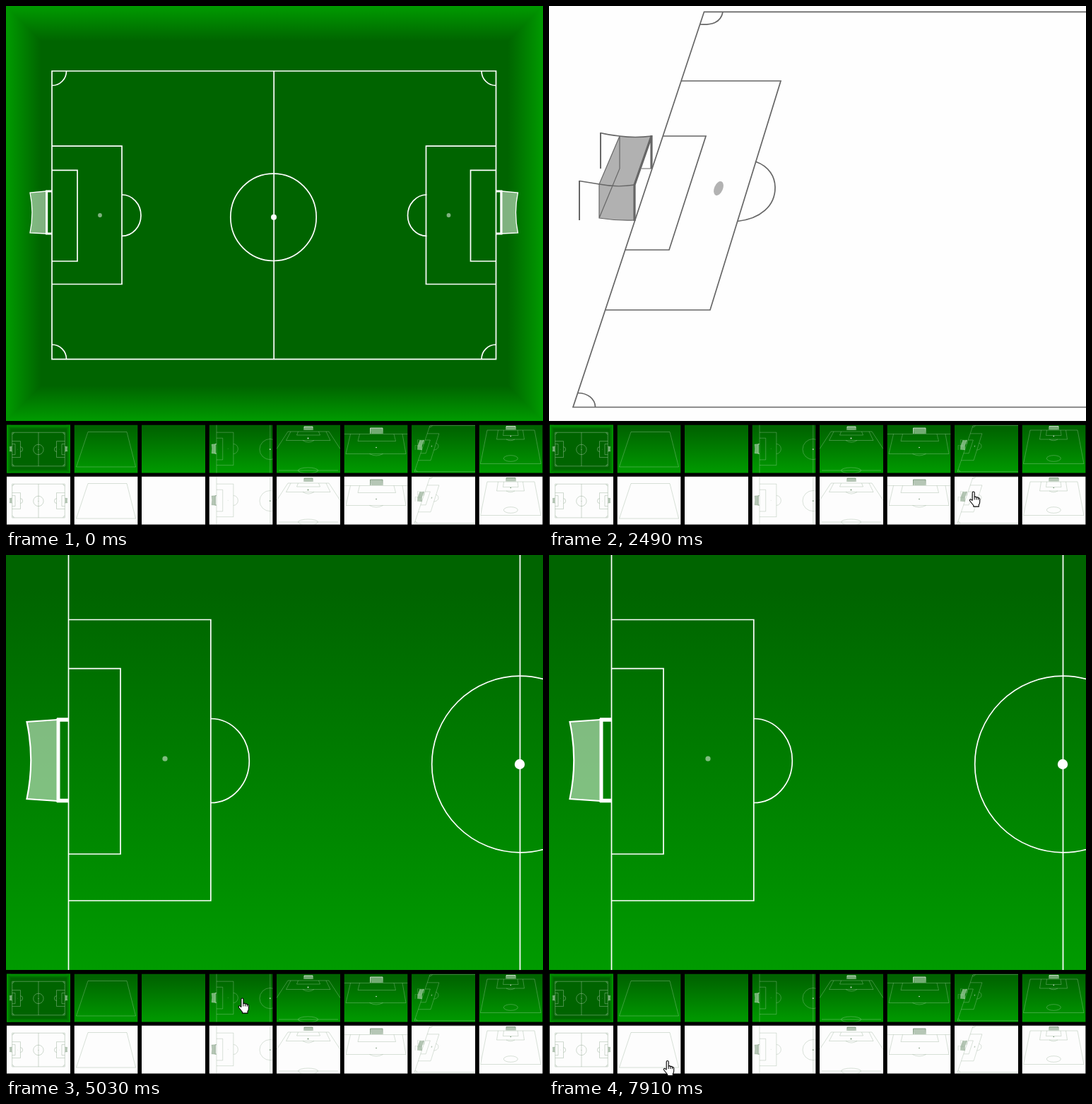
Animation of 760x737 px, one loop 8 s. Source, as an HTML page:

```html
<!DOCTYPE html>
<html lang="en">
<head>
<meta charset="utf-8">
<title>Pitch backgrounds</title>
<style>
  html, body { margin: 0; width: 100%; height: 100%; overflow: hidden; background: #000; }
  svg { display: block; width: 100vw; height: 100vh; }
  .line { fill: none; stroke: currentColor; stroke-width: var(--w); }
  .net { fill: currentColor; fill-opacity: .5; }
  .solid { fill: currentColor; }
  .frame { fill: none; stroke: currentColor; }
</style>
</head>
<body>
<svg id="stage" viewBox="0 0 760 737" preserveAspectRatio="none">
  <defs>
    <linearGradient id="grass" x2="0" y2="1">
      <stop offset=".08" stop-color="#006400"/><stop offset="1" stop-color="#009b00"/>
    </linearGradient>
    <linearGradient id="edgeX">
      <stop stop-color="#009b00"/><stop offset="1" stop-color="#006400"/>
    </linearGradient>
    <linearGradient id="edgeY" x2="0" y2="1">
      <stop stop-color="#009b00"/><stop offset="1" stop-color="#006400"/>
    </linearGradient>
    <clipPath id="mainClip"><path d="M0 0H760V587H0z"/></clipPath>
    <clipPath id="cellClip"><path d="M0 0H90V68H0z"/></clipPath>
  </defs>
</svg>
<script>
const LOOP = 8000, STEP = 70;
const stage = document.getElementById('stage');

const line = d => `<path class="line" d="${d}"/>`;
const net = d => `<path class="net" d="${d}"/>`;
const frame = (d, width) => `<path class="frame" stroke-width="${width}" d="${d}"/>`;
const dot = (x, y, r, cls = 'solid') => `<circle class="${cls}" cx="${x}" cy="${y}" r="${r}"/>`;
const mirror = (markup, width) => `<g transform="matrix(-1 0 0 1 ${width} 0)">${markup}</g>`;

// Backgrounds, 760 x 587
const plain = fill => `<path fill="${fill}" d="M0 0H760V587H0z"/>`;
const bevel = () => {
  const side = '<path fill="url(#edgeX)" d="M0 0H50V587H0z"/>';
  const end = '<path fill="url(#edgeY)" d="M0 0H760L710 50H50z"/>';
  return plain('#006400') + side + mirror(side, 760) +
    end + `<g transform="matrix(1 0 0 -1 0 587)">${end}</g>`;
};

// Pitch markings, 760 x 587
function wholePitch() {
  const area =
    line('M65 198.2H164V393.5H65M65 232.4H101V361H65') +
    line('M85.5 92A20.5 20.5 0 0 1 65 112.5M65 479A20.5 20.5 0 0 1 85.5 499.7') +
    net('M34 264L57 262V322L34 321Q40 292 34 264z') +
    frame('M57 262L34 264Q40 292 34 321L57 322', 1.3) +
    frame('M65 262H57.6V322H65', 3.2);
  const spot = line('M164 267A27 29.2 0 0 1 164 325.4') + dot(133, 296, 2.9, 'net');
  return line('M65 92H693.5V499.7H65zM379.2 92V499.7') +
    '<ellipse class="line" cx="378.5" cy="298.8" rx="60.7" ry="61.7"/>' + dot(379, 298.8, 4) +
    area + spot + mirror(area, 758.5) + mirror(spot, 759.5);
}

function halfPitch() {
  return line('M88.5 0V587M727.5 0V587M88.5 91.5H289.8V489H88.5M88.5 160.7H162V423H88.5') +
    line('M289.8 231.5A54.5 59.5 0 0 1 289.8 350.5') +
    '<circle class="line" cx="727.5" cy="296" r="124.8"/>' +
    dot(727, 296, 7.2) + dot(225, 288.2, 3.6, 'net') +
    net('M29.5 236L73 233V348L29.5 345Q41 290 29.5 236z') +
    frame('M73 233L29.5 236Q41 290 29.5 345L73 348', 2.2) +
    frame('M74 231V350', 5) + frame('M72 233H88M72 347.5H88', 5.5);
}

function slantedPitch() {
  return line('M760 8.3H219.5L34 567.5H760M187 106H328L228 430H80M161 184H222L170 345H108') +
    line('M246 8.5C243 24 230 27 213 26M40 547.5C55 547 65 556 65.5 567') +
    line('M292 220C312 227 320 242 320 257C320 283 299 301 267 304.5') +
    '<ellipse class="net" rx="6" ry="10.5" transform="translate(240 258) rotate(23)"/>' +
    net('M100 184Q122 187 145 184L121 253V303Q96 304 71 300V252z') +
    frame('M73 179.5Q85 182.5 100 184Q122 187 145 184M43 247.5L71 252Q96 257 121 253', 1.3) +
    frame('M100 184L71 252V300Q96 304 121 303M100 184V230L71 300M131 230H145', 1.2) +
    frame('M73 179V230M43 247V303', 2) +
    frame('M145 183V230M145 184L121 253V304', 3.2);
}

// Markings seen only in the picker, 90 x 68
const trapezoid = () => line('M19.5 10H74.5L87 59.5H3z');

const smallGoal = (x, y, w, h) =>
  net(`M${x} ${y}h${w}l-1 ${h}h${2 - w}z`) + frame(`M${x} ${y + h}v${-h}h${w}v${h}`, .8);

const behindGoal = () =>
  line('M0 34L16 9.5H74L90 34M20 9.5L13.5 22H76L70 9.5M30.5 9.5L28.5 14.5H61.5L59.5 9.5') +
  line('M37 22Q45 27 53 22M3 64.5H87') +
  '<ellipse class="line" cx="44.5" cy="64.5" rx="14" ry="4"/>' +
  dot(44.5, 19, .9) + smallGoal(39, 2.5, 12, 5);

const nearGoal = () =>
  line('M0 13H90M9 13L2.5 41H87.5L82.5 13M22 13L19.5 23H73L70.5 13M36 41Q45.5 46 55 41') +
  dot(45.5, 32, .8) + smallGoal(37, 4.5, 17.5, 8);

const highView = () =>
  line('M11.5 7.5H78.5L87.5 55H2zM27 7.5L25 20.5H64L62 7.5M35 7.5L34 15H55.5L54.5 7.5') +
  line('M38.5 20.5Q44.5 24 50.5 20.5') +
  '<ellipse class="line" cx="44.8" cy="47.5" rx="10" ry="4.3"/>' +
  dot(44.8, 16, .8) + smallGoal(38.5, 2, 13, 5);

const shrink = markup => `<g transform="scale(.1186 .1168)">${markup}</g>`;
const shrunkLines = (draw, width) => () => `<g style="--w:${width}">${shrink(draw())}</g>`;

const picker = [
  shrunkLines(wholePitch, 2.8), trapezoid, () => '', shrunkLines(halfPitch, 2.2),
  behindGoal, nearGoal, shrunkLines(slantedPitch, 2.2), highView
];

function cell(draw, i, isGreen) {
  const back = isGreen ? (i ? plain('url(#grass)') : bevel()) : plain('#fdfdfd');
  const look = isGreen ? 'color:#e6f0e6' : 'color:#6f8f6f';
  return `<g transform="translate(${1 + i * 95.5} ${isGreen ? 592.5 : 665.5})" clip-path="url(#cellClip)"
    style="${look};--w:.27">${shrink(back)}${draw()}</g>`;
}

const view = (back, draw, color) =>
  `<g class="view" clip-path="url(#mainClip)" style="color:${color};--w:1.7">${back}${draw()}</g>`;

stage.insertAdjacentHTML('beforeend',
  '<path d="M0 0H760V737H0z"/>' +
  view(bevel(), wholePitch, '#fff') +
  view(plain('#fefefe'), slantedPitch, '#666') +
  view(plain('url(#grass)'), halfPitch, '#fff') +
  picker.map((draw, i) => cell(draw, i, true) + cell(draw, i, false)).join('') +
  `<g id="pointer">
    <circle id="click" cx="4.3" cy=".5" r="13.6" fill="#ff0" fill-opacity=".5"/>
    <path fill="#fff" stroke="#000" stroke-width="1.1" stroke-linejoin="round"
      d="M4.2 12.5V2a1.5 1.5 0 0 1 3 0V8q1.6-1 2.8.6q1.7-.8 2.6.8q1.8-.4 2.1 1.6V15q0 2.5-1.4 4V21.6H5.8V20L1 14q-1.2-2.2.5-2.8q1.4-.2 2.7 2.2"/>
    <path fill="none" stroke="#000" d="M7.2 8v4M10 9v3M12.6 9.6v2.6"/>
  </g>`);

const views = [...stage.querySelectorAll('.view')];
const pointer = document.getElementById('pointer');
const click = document.getElementById('click');

// Pointer moves: [time, x, y], at rest before and after each move
const moves = [
  [[980, 641, 733], [1400, 614, 710], [1760, 595, 686.5]],
  [[3150, 595, 686.5], [3560, 497, 701], [3990, 380, 682], [4830, 328.7, 626.5]],
  [[5620, 328.7, 626.5], [6250, 269.5, 669.5], [6450, 253, 684.5],
   [7290, 191, 713], [7640, 157, 703], [7910, 162, 715]]
];

function slope(points, i, axis) {
  const before = points[i - 1], after = points[i + 1];
  return before && after ? (after[axis] - before[axis]) / (after[0] - before[0]) : 0;
}

function along(points, time, axis) {
  const last = points.length - 1;
  if (time >= points[last][0]) return points[last][axis];
  const i = Math.max(0, points.findIndex(p => p[0] > time) - 1);
  const a = points[i], b = points[i + 1], span = b[0] - a[0];
  const u = Math.max(0, (time - a[0]) / span), v = 1 - u;
  return v * v * (1 + 2 * u) * a[axis] + u * u * (3 - 2 * u) * b[axis] +
    span * u * v * (v * slope(points, i, axis) - u * slope(points, i + 1, axis));
}

const show = (el, on) => el.setAttribute('visibility', on ? 'visible' : 'hidden');
const within = (t, from, to) => t >= from && t < to;

function draw(t) {
  const current = t < 2490 ? 0 : t < 5030 ? 1 : 2;
  views.forEach((el, i) => show(el, i === current));
  show(pointer, t >= 1050);
  show(click, within(t, 2340, 2490) || within(t, 4900, 5030));

  const move = moves.filter(m => t >= m[0][0]).pop() || moves[0];
  const start = move[0][0], end = move[move.length - 1][0];
  const time = t >= end ? end : start + Math.floor((t - start) / STEP) * STEP;
  pointer.setAttribute('transform', `translate(${along(move, time, 1)} ${along(move, time, 2)})`);
}

const origin = performance.now();
function tick() {
  draw((performance.now() - origin) % LOOP);
  requestAnimationFrame(tick);
}
tick();
</script>
</body>
</html>
```
